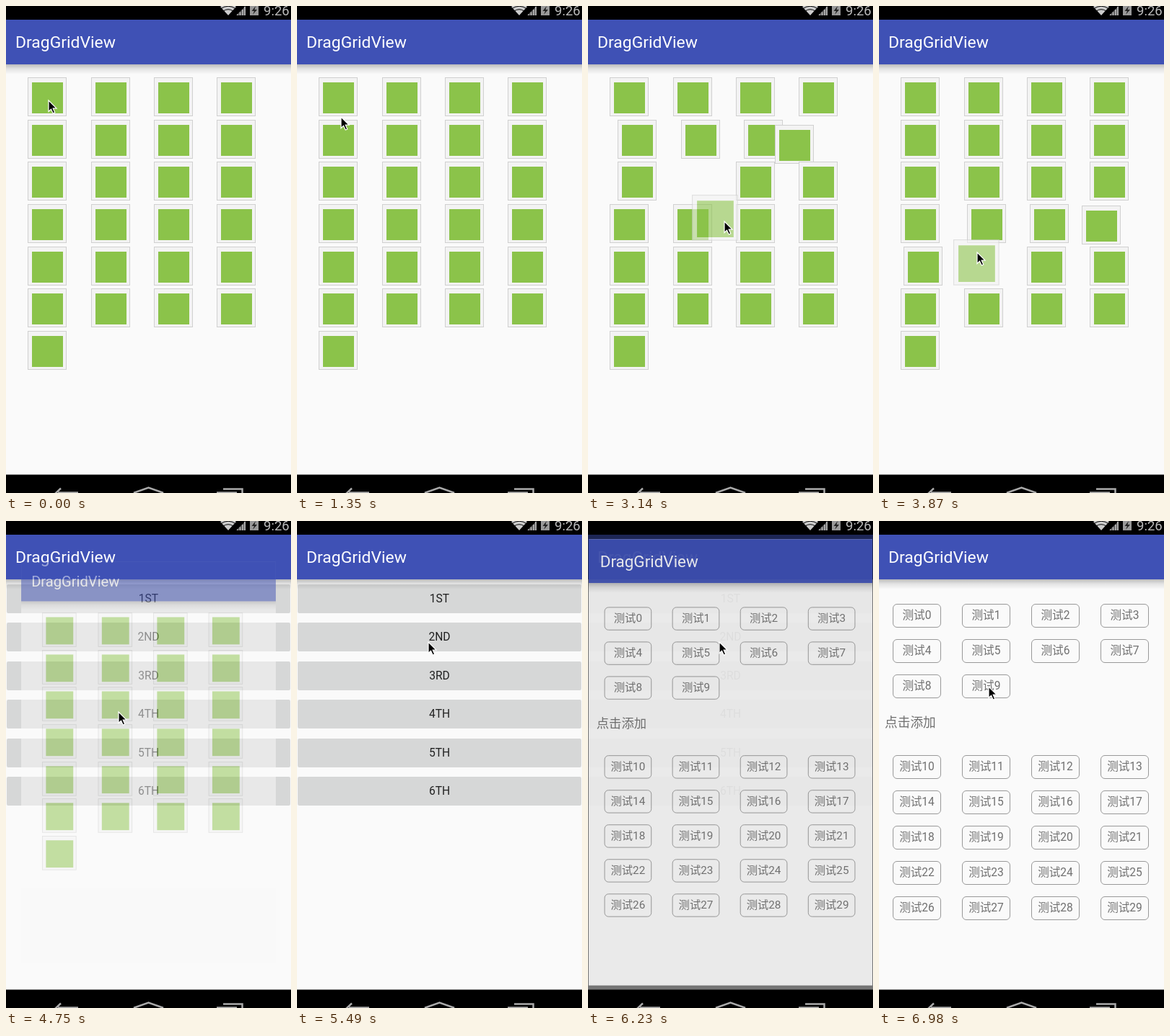
An HTML page for the animation above (8000 ms loop, 395 by 676 pixels).

```html
<!DOCTYPE html>
<html lang="zh-CN">
<head>
<meta charset="utf-8">
<title>DragGridView</title>
<style>
html, body { margin: 0; width: 100%; height: 100%; overflow: hidden; background: #000; }
body { position: relative; font-family: Roboto, "Noto Sans CJK SC", "Noto Sans CJK", sans-serif; }
div, svg { position: absolute; box-sizing: border-box; white-space: nowrap; }
.win { left: -3px; top: 19px; width: 401px; height: 632px; background: #fafafa; }
.page { left: 3px; top: -19px; }
.bar { left: -3px; top: 19px; width: 401px; height: 62px; background: #3f51b5; }
.title { left: 16px; top: 0; font-size: 22.9px; line-height: 63px; color: #fff; }
.shade { left: -3px; top: 81px; width: 401px; height: 14px;
  background: linear-gradient(rgba(0,0,0,.25), rgba(0,0,0,.09) 45%, transparent); }
.tile { left: 0; top: 0; width: 54px; height: 54px; background: #f3f3f3;
  border: 1px solid #d0d0d0; transform-origin: 0 0; }
.tile::after { content: ""; position: absolute; left: 5px; top: 6px; width: 43px; height: 43px; background: #8bc34a; }
.btn { left: 1px; width: 393px; height: 40px; border-radius: 2px; background: #d6d7d7;
  color: #212121; font-size: 15.6px; line-height: 41px; text-align: center; }
.chip { width: 67px; height: 33px; border: 1px solid #999; border-radius: 6px;
  color: #707070; font-size: 15.6px; line-height: 31px; text-align: center; }
.label { left: 8px; top: 268px; font-size: 17.7px; line-height: 25px; color: #707070; }
</style>
</head>
<body>
<script>
const TILES = 25, DRAGGED = 4;
const START = 1348, TICK = 147.8;
// [from slot, to slot, start ms]
const moves = [[4, 9, 2891], [9, 13, 3300], [13, 17, 3600]];
// [tick, x, y]
const path = [
  [-1, 59, 131], [0, 61, 154], [1, 64, 177], [8, 64, 177], [10, 145, 225],
  [12, 189, 299], [14, 152, 308], [16, 136.6, 342.9], [19, 136.6, 342.9],
  [28, 182, 168], [33, 182, 168], [38, 152, 230]
];

const lerp = (a, b, p) => a + (b - a) * p;
const clamp = p => Math.max(0, Math.min(1, p));
const ease = p => (1 - Math.cos(Math.PI * clamp(p))) / 2;
const cell = i => [30 + Math.ceil(87.3 * (i % 4)), 99 + Math.round(58.67 * (i >> 2))];

function add(parent, cls, text = "", x, y) {
  const el = document.createElement("div");
  el.className = cls;
  el.textContent = text;
  if (x !== undefined) el.style.left = x + "px";
  if (y !== undefined) el.style.top = y + "px";
  return parent.appendChild(el);
}

function makeWindow(fill) {
  const win = add(document.body, "win"), page = add(win, "page");
  fill(page);
  add(add(page, "bar"), "title", "DragGridView");
  add(page, "shade");
  return win;
}

const tiles = [];
let lifted;

const menu = makeWindow(page =>
  ["1ST", "2ND", "3RD", "4TH", "5TH", "6TH"].forEach((s, i) => add(page, "btn", s, 1, 88 + 53.4 * i)));

const grid = makeWindow(page => {
  for (let i = 0; i < TILES; i++) tiles.push(add(page, "tile"));
  lifted = add(page, "tile");
});

const chips = makeWindow(page => {
  for (let i = 0; i < 30; i++) {
    const slot = i < 10 ? i : i - 10, top = i < 10 ? 114.5 : 324.5;
    add(page, "chip", "测试" + i, 19 + 96 * (slot % 4), top + 49 * (slot >> 2));
  }
  add(page, "label", "点击添加");
});

document.body.insertAdjacentHTML("beforeend", `
<svg width="395" height="676" style="left:0;top:0">
  <path d="M0 0H395V19H0ZM0 650.4H395V676H0Z"/>
  <path d="M297 1Q308 -7 319 1L308 13Z" fill="#ccc"/>
  <path d="M298 3.500Q308 -3 318 3.500M301 7Q308 2.500 315 7" fill="none" stroke="#000"/>
  <path d="M319 13L332 0V13Z" fill="#555"/>
  <path d="M320 13V11.500H322V13ZM323.500 13V8.500H325.500V13ZM327 13V5H329V13ZM330 13V1H332V13Z" fill="#aaa"/>
  <path d="M338 0H350V13H338Z" fill="#999"/>
  <path d="M346 0L340.500 7H344L342 12 348 5H344.500Z" fill="#222"/>
  <text x="357" y="12.500" font-size="18.500" fill="#bbb">9:26</text>
  <g fill="none" stroke="#aaa" stroke-width="2.500">
    <path d="M76 669.500L68 677M72 675.500H100"/>
    <path d="M178 677V675.500L197.500 668.500 217 675.500V677"/>
    <path d="M301 670.500H327.500V677M292 675.500H320"/>
  </g>
</svg>
<svg id="cursor" width="20" height="24" viewBox="-2 -2 20 24" style="left:-2px;top:-2px">
  <path d="M0 0V15.500L3.500 12.200 6.200 18 8.800 16.900 6.200 11.200H11Z" stroke="#fff" stroke-width="1.200"/>
</svg>`);
const cursor = document.getElementById("cursor");

function place(el, [x, y], scale = 1) {
  el.style.transform = `translate(${x}px,${y}px) scale(${scale})`;
}

function show(el, alpha, scale = 1) {
  el.style.visibility = alpha ? "visible" : "hidden";
  el.style.opacity = alpha;
  el.style.transform = `scale(${scale})`;
}

function pointer(k) {
  if (k <= path[0][0]) return path[0].slice(1);
  const n = path.findIndex(p => p[0] >= k);
  if (n < 0) return path[path.length - 1].slice(1);
  const [k0, x0, y0] = path[n - 1], [k1, x1, y1] = path[n];
  const p = (k - k0) / (k1 - k0);
  return [lerp(x0, x1, p), lerp(y0, y1, p)];
}

function tilePos(i, time) {
  let slot = i, [x, y] = cell(i);
  for (const [from, to, start] of moves) {
    if (slot <= from || slot > to) continue;
    const p = ease((time - start) / 300), [nx, ny] = cell(--slot);
    x = lerp(x, nx, p);
    y = lerp(y, ny, p);
  }
  return [Math.round(x), Math.round(y)];
}

function draw() {
  const k = Math.floor((performance.now() % 8000 - START) / TICK);
  const time = START + k * TICK;
  const dragging = k >= 7 && k < 19;

  place(cursor, pointer(k).map(Math.floor));
  tiles.forEach((el, i) => place(el, i === DRAGGED ? cell(k < 7 ? 4 : 17) : tilePos(i, time)));
  tiles[DRAGGED].style.display = dragging ? "none" : "";

  // the lifted tile trails the pointer by half a tick
  const [x, y] = pointer(k - 0.5);
  place(lifted, [Math.round(x - 34), Math.round(y - 18.6)], 1.18);
  lifted.style.display = dragging ? "" : "none";
  lifted.style.opacity = k < 9 ? 1 : 0.6;

  if (k < 23) show(grid, 1);
  else if (k < 25) show(grid, k === 23 ? 0.5 : 0.1, k === 23 ? 0.88 : 0.82);
  else show(grid, 0);

  show(menu, k < 23 || k > 33 ? 0 : k === 33 ? 0.47 : 1);
  show(chips, k < 33 ? 0 : k === 33 ? 0.877 : 1, k === 33 ? 0.98 : 1);
  requestAnimationFrame(draw);
}
draw();
</script>
</body>
</html>
```
